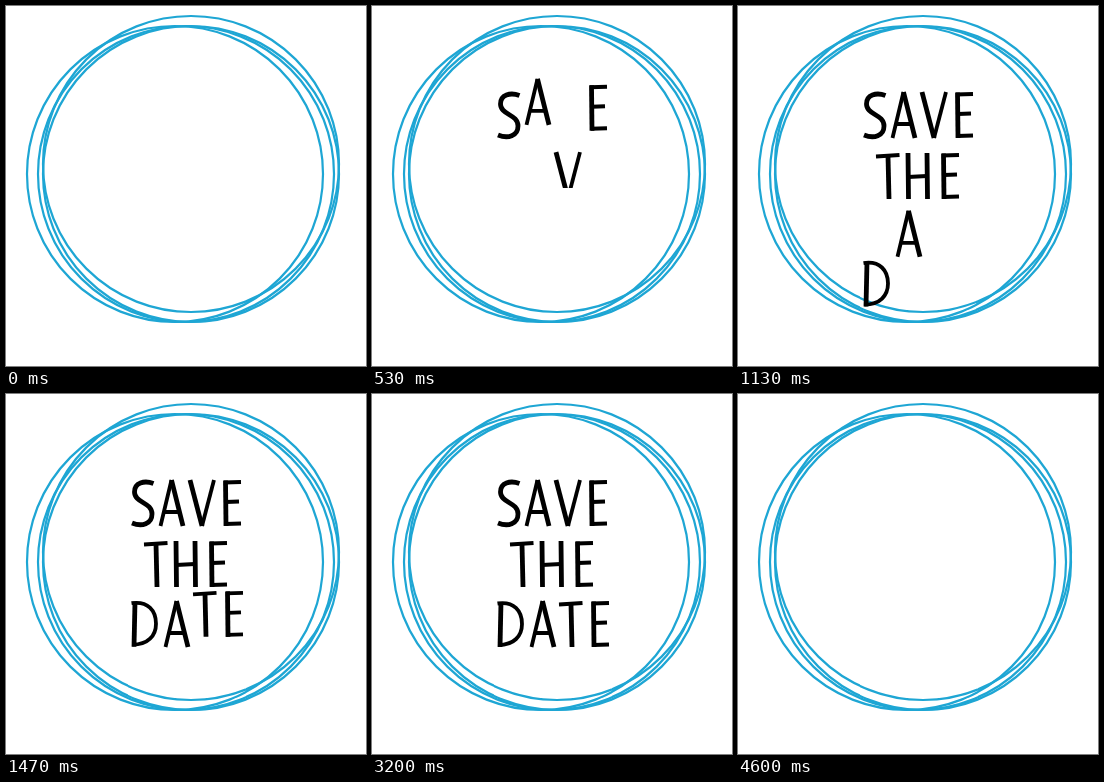
Write an HTML page that moves like this. It is 360 px wide and 360 px high and loops after 4790 ms.

```html
<!DOCTYPE html>
<html lang="en">
<head>
<meta charset="utf-8">
<title>Save the date</title>
<style>
  html, body { margin: 0; width: 100%; height: 100%; overflow: hidden; background: #fff; }
  svg { display: block; width: 100vw; height: 100vh; }
  .rings { fill: none; stroke: #1ea6d4; stroke-width: 2.2; }
  .lettering { fill: none; stroke: #000; stroke-linejoin: round; }
  .heavy { stroke-width: 4.8; }
  .light { stroke-width: 3.8; }
</style>
</head>
<body>
<svg viewBox="0 0 360 360" role="img" aria-label="Save the date">
  <g class="rings">
    <circle cx="169" cy="168" r="148"/>
    <circle cx="180" cy="168" r="148"/>
    <circle cx="185" cy="168" r="148"/>
    <circle cx="185" cy="158" r="148"/>
  </g>
  <g class="lettering"></g>
</svg>
<script>
const LOOP = 4790, FRAME = 1000 / 15, LAST_FRAME = 69;
const TRAVEL = 100, ENTER = 400, LEAVE = 300, OVERSHOOT = 2;
const LETTER_HEIGHT = 46, MARGIN = 50;

// Hand-lettered glyphs: [heavy strokes, light strokes]
const glyphs = {
  S: ['M23.5 3.5C14 0 4.5 3 4.5 12C4.5 23 22 22 22 34C22 44 12 47 2 43', ''],
  A: ['M12.5 0L24 46', 'M12.5 0L1.5 46M6 32H20'],
  V: ['M2 0L14 46', 'M14 46L26 0'],
  E: ['M3.5 0.5L4 46', 'M2 2.5L19 2M4 22L17 21.5M3 44L19 43.5'],
  T: ['M12 3L13 46', 'M0 3.5L23.5 2'],
  H: ['M3 0L3.5 46M22 0L22.5 46', 'M3 24L22 23'],
  D: ['M5 1L4 46', 'M1.5 2.5C18 0 26 10 26 23C26 35 18 44 2.5 44']
};

// Each letter: glyph, x, time it enters, time it leaves
const lines = [
  { top: 86, letters: [['S', 124, 130, 3630], ['A', 153, 311, 3685], ['V', 182, 497, 3791], ['E', 216, 373, 3856]] },
  { top: 147, letters: [['T', 138, 560, 3930], ['H', 167, 640, 3985], ['E', 202, 720, 4040]] },
  { top: 207, letters: [['D', 124, 1083, 4095], ['A', 158, 993, 4150], ['T', 187, 1190, 4215], ['E', 218, 1290, 4270]] }
];

function add(parent, tag, attributes) {
  const node = document.createElementNS('http://www.w3.org/2000/svg', tag);
  for (const name in attributes) node.setAttribute(name, attributes[name]);
  return parent.appendChild(node);
}

const svg = document.querySelector('svg');
const lettering = document.querySelector('.lettering');
const actors = [];

lines.forEach(({ top, letters }, i) => {
  const clip = add(svg, 'clipPath', { id: 'line' + i });
  add(clip, 'rect', { x: 0, y: top - MARGIN, width: 360, height: LETTER_HEIGHT + 2 * MARGIN });
  const row = add(lettering, 'g', { 'clip-path': `url(#line${i})` });
  for (const [glyph, x, enter, leave] of letters) {
    const node = add(row, 'g', {});
    const [heavy, light] = glyphs[glyph];
    add(node, 'path', { class: 'heavy', d: heavy });
    if (light) add(node, 'path', { class: 'light', d: light });
    actors.push({ node, x, top, enter, leave });
  }
});

const progress = (time, start, duration) => Math.min(1, Math.max(0, (time - start) / duration));

function backOut(p) {
  const q = p - 1;
  return 1 + (OVERSHOOT + 1) * q ** 3 + OVERSHOOT * q ** 2;
}

function draw(now) {
  const frame = Math.min(LAST_FRAME, Math.floor((now % LOOP + 4) / FRAME));
  const time = frame * FRAME;
  for (const { node, x, top, enter, leave } of actors) {
    const rise = backOut(progress(time, enter, ENTER));
    const fall = progress(time, leave, LEAVE) ** 3;
    const y = top + TRAVEL * (1 - rise + fall);
    node.setAttribute('transform', `translate(${x} ${y.toFixed(2)})`);
  }
}

const start = performance.now();
function tick() {
  draw(performance.now() - start);
  requestAnimationFrame(tick);
}
tick();
</script>
</body>
</html>
```
